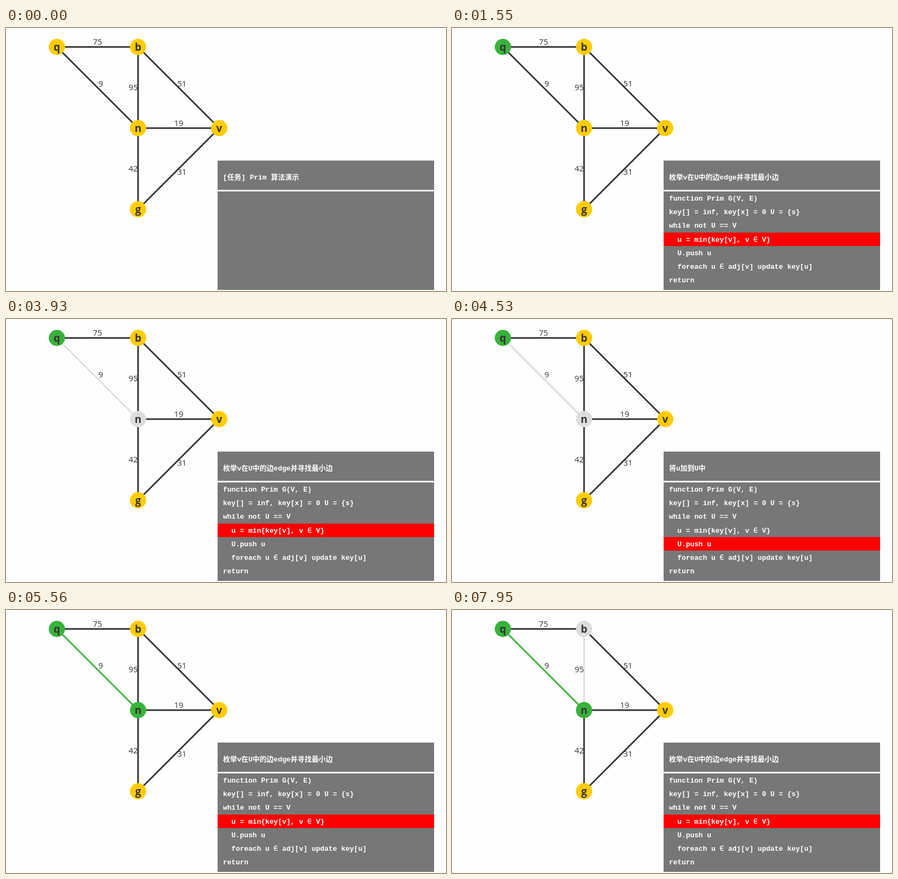
These frames come from a looping animation (813 by 486 pixels, 8 s). An HTML page with a canvas:

```html
<!DOCTYPE html>
<html lang="zh">
<head>
<meta charset="utf-8">
<title>Prim</title>
<style>
html, body { margin: 0; width: 100%; height: 100%; overflow: hidden; background: #fefefe; }
canvas { display: block; }
</style>
</head>
<body>
<canvas id="stage" width="813" height="486"></canvas>
<script>
const ctx = document.getElementById('stage').getContext('2d');
const LOOP = 8000;
const SANS = '"Open Sans", "Noto Sans", sans-serif';
const MONO = '"Liberation Mono", "DejaVu Sans Mono", "Noto Sans CJK SC", "Noto Sans CJK", monospace';

const DARK = [51, 51, 51];
const YELLOW = [255, 204, 0];
const GREEN = [57, 178, 60];
const PALE = [221, 221, 221];

const nodes = { q: [94, 35], b: [244, 35], n: [244, 185], v: [394, 185], g: [244, 335] };

// edge name: weight, label centre
const edges = {
  qb: ['75', 169, 26],
  qn: ['9', 175, 103],
  bn: ['95', 235, 110],
  bv: ['51', 325, 103],
  nv: ['19', 319, 176],
  ng: ['42', 235, 260],
  vg: ['31', 325, 266]
};

const code = [
  'function Prim G(V, E)',
  'key[] = inf, key[x] = 0 U = {s}',
  'while not U == V',
  '  u = min{key[v], v ∈ V}',
  '  U.push u',
  '  foreach u ∈ adj[v] update key[u]',
  'return'
];

const FIND = '枚举v在U中的边edge并寻找最小边';

// start time, title, highlighted row
const panels = [
  [0, '[任务] Prim 算法演示', -1],
  [500, '初始化', 1],
  [1550, FIND, 3],
  [4530, '将u加到U中', 4],
  [5560, FIND, 3]
];

// step times and the colours each part fades to
const fades = [
  [[650, 800, 950], { q: GREEN }],
  [[1700, 1850, 1990], { qb: PALE, b: PALE }],
  [[2740, 2890], { qb: DARK, b: YELLOW }],
  [[3780, 3930], { qn: PALE, n: PALE }],
  [[4680, 4820, 4970], { qn: GREEN, n: GREEN }],
  [[5710, 5860, 6010], { qb: PALE, b: PALE }],
  [[6750, 6900], { qb: DARK, b: YELLOW }],
  [[7800, 7950], { bn: PALE, b: PALE }]
];

const levels = { 2: [0, 0.5, 1], 3: [0, 0.33, 0.83, 1] };

const mix = (a, b, k) => a.map((c, i) => c + (b[i] - c) * k);
const css = c => `rgb(${c.map(Math.round).join(',')})`;

function coloursAt(t) {
  const out = {};
  for (const id in nodes) out[id] = YELLOW;
  for (const id in edges) out[id] = DARK;
  for (const [times, targets] of fades) {
    const k = levels[times.length][times.filter(s => s <= t).length];
    for (const id in targets) out[id] = mix(out[id], targets[id], k);
  }
  return out;
}

function rect(x, y, w, h, colour) {
  ctx.fillStyle = colour;
  ctx.fillRect(x, y, w, h);
}

function write(text, x, y, font, colour, align) {
  ctx.font = font;
  ctx.fillStyle = colour;
  ctx.textAlign = align;
  ctx.fillText(text, x, y);
}

function drawGraph(t) {
  const colours = coloursAt(t);
  ctx.lineWidth = 3;
  for (const id in edges) {
    ctx.strokeStyle = css(colours[id]);
    ctx.beginPath();
    ctx.moveTo(...nodes[id[0]]);
    ctx.lineTo(...nodes[id[1]]);
    ctx.stroke();
  }
  for (const id in nodes) {
    const [x, y] = nodes[id];
    ctx.fillStyle = css(colours[id]);
    ctx.beginPath();
    ctx.arc(x, y, 15, 0, Math.PI * 2);
    ctx.fill();
    write(id, x, y + 7, `bold 19px ${SANS}`, css(DARK), 'center');
  }
  for (const id in edges) {
    const [weight, x, y] = edges[id];
    write(weight, x, y + 5, `15px ${SANS}`, css(DARK), 'center');
  }
}

function drawPanel(t) {
  const [, title, active] = panels.filter(p => p[0] <= t).pop();
  const font = `bold 13px ${MONO}`;
  const rowTop = i => Math.round(301.6 + i * 25.3);
  rect(391, 245, 400, 54, '#777');
  rect(391, 299, 400, 3, '#fff');
  rect(391, 302, 400, 182, '#777');
  write(title, 401, 280, font, '#fff', 'left');
  if (active < 0) return;
  rect(391, rowTop(active), 400, rowTop(active + 1) - rowTop(active), '#f00');
  code.forEach((line, i) => write(line, 401, rowTop(i) + 17, font, '#fff', 'left'));
}

function draw(t) {
  rect(0, 0, 813, 486, '#fefefe');
  drawGraph(t);
  drawPanel(t);
}

const start = performance.now();
function tick() {
  draw((performance.now() - start) % LOOP);
  requestAnimationFrame(tick);
}
tick();
</script>
</body>
</html>
```
